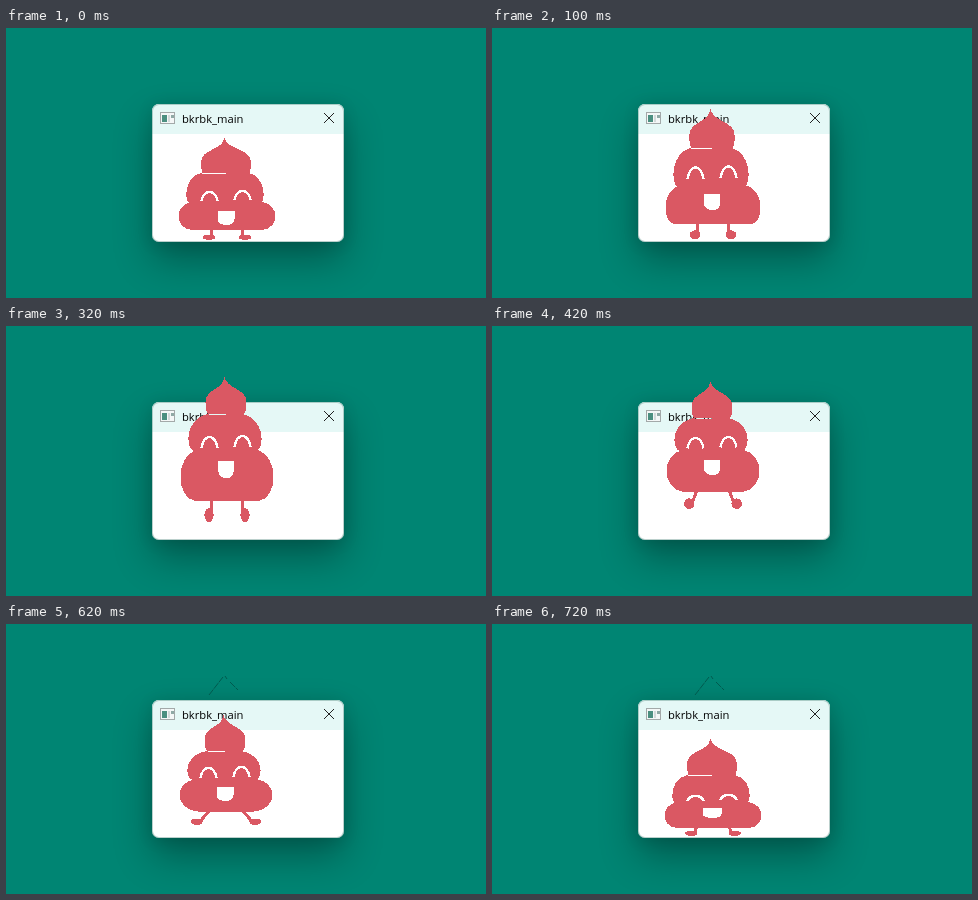
These frames come from a looping animation (480 by 270 pixels, 0.78 s). An HTML page:

```html
<!DOCTYPE html>
<html lang="en">
<head>
<meta charset="utf-8">
<title>bkrbk_main</title>
<style>
  html, body { margin: 0; width: 100%; height: 100%; overflow: hidden; background: #008573; }
  .stage { position: absolute; left: 0; top: 0; width: 480px; height: 270px; overflow: hidden; }
  .window {
    position: absolute; left: 146px; top: 76px; width: 192px; height: 138px;
    border-radius: 7px; background: #fff;
    box-shadow: 0 18px 38px rgba(0, 0, 0, .32), 0 2px 16px rgba(0, 0, 0, .12);
  }
  .window::after {
    content: ""; position: absolute; inset: 0; border-radius: 7px;
    box-shadow: inset 0 0 0 1px rgba(60, 120, 110, .35);
  }
  .bar { height: 30px; border-radius: 7px 7px 0 0; background: #e5f8f6; }
  .title {
    position: absolute; left: 30px; top: 7px; white-space: pre; color: #000;
    font: 11.2px/16px "Open Sans", "Noto Sans", sans-serif;
  }
  svg { position: absolute; left: 0; top: 0; width: 480px; height: 270px; }
  #hero { shape-rendering: crispEdges; }
  #body, .foot { fill: #da5863; }
  .leg { fill: none; stroke: #da5863; stroke-width: 3; }
  .eye { fill: none; stroke: #fff; stroke-width: 2.4; }
  #mouth { fill: #fff; }
  #trail { fill: none; stroke: #005a4e; stroke-dasharray: 7 1; }
</style>
</head>
<body>
<div class="stage">
  <div class="window">
    <div class="bar"></div>
    <div class="title">bkrbk_main</div>
  </div>
  <svg viewBox="0 0 480 270">
    <g shape-rendering="crispEdges">
      <rect x="154" y="84" width="15" height="12" fill="#a3a9a9"/>
      <rect x="155" y="85" width="13" height="10" fill="#f4f7f7"/>
      <rect x="156" y="87" width="5" height="7" fill="#4b8f80"/>
      <rect x="162" y="87" width="2" height="7" fill="#d3dada"/>
      <rect x="165" y="87" width="3" height="3" fill="#8fa9a5"/>
    </g>
    <path d="M318 85l10 10M328 85l-10 10" stroke="#222"/>
    <path id="trail" d="M203 71L217 53M219 52L221 55M224 58L232 66"/>
    <g id="hero">
      <path class="leg"/><path class="leg"/>
      <ellipse class="foot"/><ellipse class="foot"/>
      <path id="body"/>
      <path class="eye"/><path class="eye"/>
      <path id="mouth"/>
    </g>
  </svg>
</div>
<script>
  const LOOP = 780, MID = 220;
  const $ = id => document.getElementById(id);
  const all = name => document.querySelectorAll(name);
  const set = (el, attrs) => Object.entries(attrs).forEach(([k, v]) => el.setAttribute(k, v));

  // tip, neck, waist, base and sole are heights on the stage; hem is half the base width
  const rest = { tip: 109, neck: 145, waist: 174, base: 202, hem: 35, squat: 1,
    eye: 173, lift: 9, mouth: 183, jaw: 14, sole: 212, spread: 0 };
  const tall = { tip: 51, neck: 95, waist: 141, base: 190, hem: 43, squat: 0,
    eye: 129, lift: 14, mouth: 149, jaw: 18, sole: 211, spread: 0 };
  const leap = { tip: 50, neck: 88, waist: 124, base: 175, hem: 32, squat: 0,
    eye: 122, lift: 11, mouth: 135, jaw: 17, sole: 196, spread: 0 };
  const glide = { tip: 59, neck: 96, waist: 124, base: 157, hem: 26, squat: 0,
    eye: 123, lift: 10, mouth: 132, jaw: 14, sole: 170, spread: 12 };
  const squash = { tip: 114, neck: 151, waist: 178, base: 204, hem: 36, squat: 1,
    eye: 177, lift: 5, mouth: 184, jaw: 10, sole: 212, spread: 4 };

  const blend = (a, b) =>
    Object.fromEntries(Object.keys(a).map(k => [k, (a[k] + b[k]) / 2]));

  const steps = [
    { at: 0, pose: rest }, { at: 100, pose: blend(rest, tall) },
    { at: 200, pose: tall }, { at: 320, pose: leap },
    { at: 420, pose: blend(leap, glide) }, { at: 520, pose: glide },
    { at: 620, pose: glide, shift: '-1 31' }, { at: 720, pose: squash }
  ];

  // one lobe between two heights, bulging to half width w
  function lobe(cx, top, bottom, inTop, w, inBottom) {
    const c = (4 * w - (inTop + inBottom) / 2) / 3, h = bottom - top;
    const y1 = top + h * .12, y2 = bottom - h * .06;
    return `M${cx - inTop} ${top}H${cx + inTop}` +
      `C${cx + c} ${y1} ${cx + c} ${y2} ${cx + inBottom} ${bottom}H${cx - inBottom}` +
      `C${cx - c} ${y2} ${cx - c} ${y1} ${cx - inTop} ${top}Z`;
  }

  // pointed crown that flares out to half width w
  function crown(cx, tip, neck, w, foot) {
    const y = k => tip + (neck - tip) * k;
    const side = s => `M${cx} ${neck}L${cx - 2} ${tip}` +
      `C${cx + s} ${y(.36)} ${cx + s * w} ${y(.3)} ${cx + s * w} ${y(.68)}` +
      `C${cx + s * w} ${y(.85)} ${cx + s * w * .95} ${y(.95)} ${cx + s * foot} ${neck}Z`;
    return side(1) + side(-1);
  }

  function draw({ at, pose: p, shift = '0 0' }) {
    const grow = (base, extra) => base + extra * p.squat;
    const neckW = grow(17, 7), waistW = grow(31, 5);
    $('body').setAttribute('d',
      crown(MID, p.tip, p.neck + 1, grow(20.5, 4.5), neckW) +
      lobe(MID - 1, p.neck, p.waist + 1, neckW, grow(36, 2), waistW) +
      lobe(MID + 1, p.waist, p.base, waistW, grow(46.5, 2), p.hem));

    const half = 12 - p.jaw / 4, mid = p.mouth + p.jaw * .55, chin = p.mouth + p.jaw;
    $('mouth').setAttribute('d', `M${MID - half} ${p.mouth}h${half * 2}V${mid}` +
      `Q${MID + half} ${chin} ${MID + 1} ${chin}Q${MID - half} ${chin} ${MID - half} ${mid}Z`);

    const droop = Math.min(1, Math.max(0, (p.sole - p.base - 12) / 8));
    const rx = 6.3 - 1.7 * droop, ry = 2.7 + 4.2 * droop;
    [-1, 1].forEach((s, i) => {
      const x = MID + s * 16.5, y = p.eye - (s > 0 ? 1 : 0), peak = y - p.lift * 4 / 3;
      set(all('.eye')[i], { d: `M${x - 8} ${y}C${x - 6} ${peak} ${x + 6} ${peak} ${x + 8} ${y}` });

      const cx = MID + 1 + s * (18 + p.spread * .95), cy = p.sole - ry;
      set(all('.foot')[i], { cx, cy, rx, ry });
      set(all('.leg')[i], { d: `M${MID + 1 + s * 16} ${p.base - 2}L${cx - s * rx / 2} ${cy}` });
    });

    $('hero').setAttribute('transform', `translate(${shift})`);
    $('trail').style.visibility = at >= 520 ? 'visible' : 'hidden';
  }

  const start = performance.now();
  let shown;
  function tick() {
    const t = (performance.now() - start) % LOOP;
    const step = steps.filter(s => s.at <= t).pop();
    if (step !== shown) draw(shown = step);
    requestAnimationFrame(tick);
  }
  tick();
</script>
</body>
</html>
```
